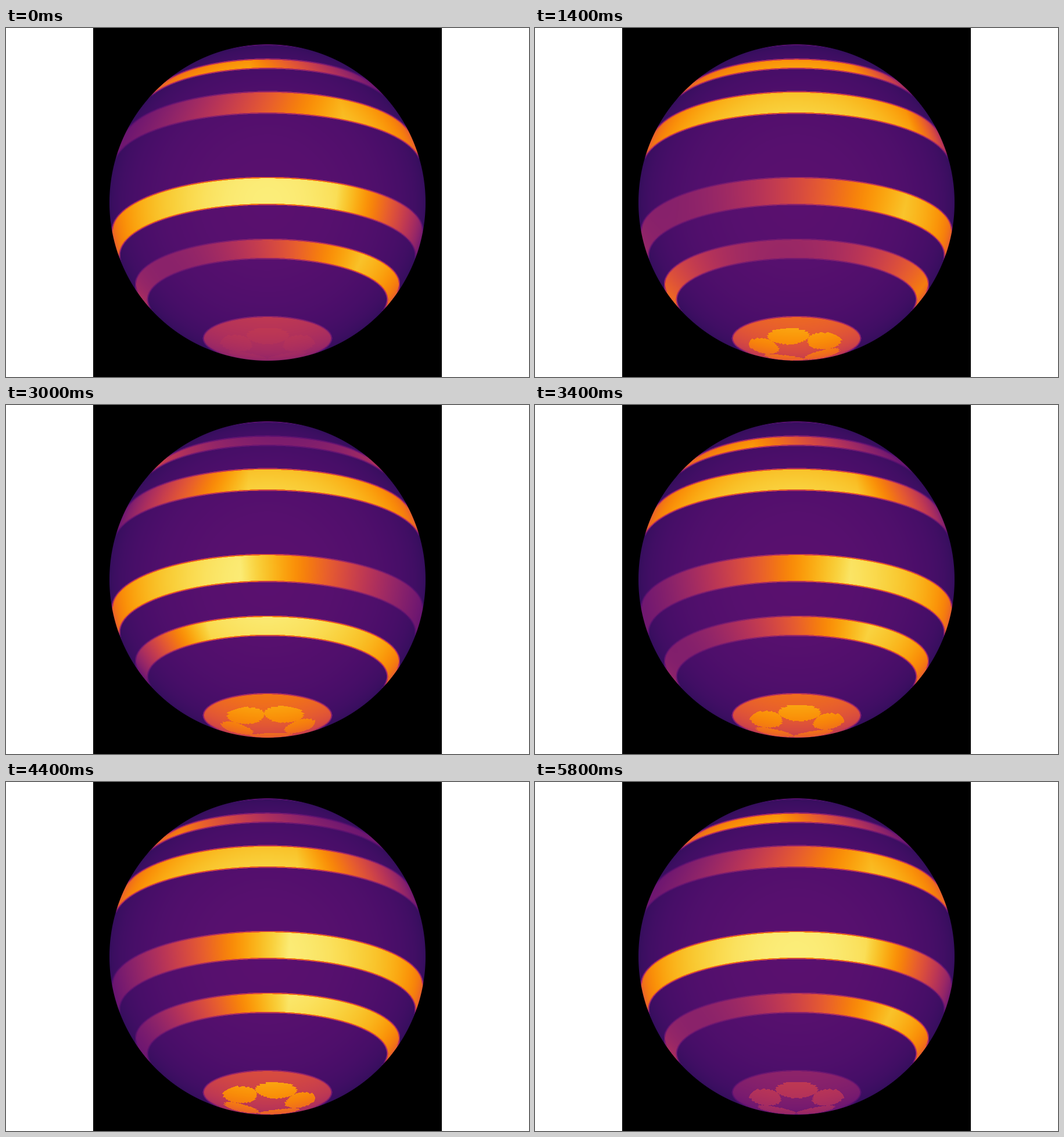
Recreate the animation shown at these times as an HTML page with a canvas. Size 900x600 px, loop 6000 ms.

```html
<!DOCTYPE html>
<html lang="en">
<head>
<meta charset="utf-8">
<title>Banded sphere</title>
<style>
  html, body { margin: 0; width: 100%; height: 100%; overflow: hidden; background: #fff; }
  canvas { display: block; position: absolute; left: 150px; top: 0; width: 600px; height: 600px; }
</style>
</head>
<body>
<canvas id="stage" width="600" height="600"></canvas>
<script>
const SIZE = 600, CENTER = 300, RADIUS = 272;
const LOOP = 6000, STEP = 200, CYCLE = 29;
const RAD = Math.PI / 180, TILT = 20 * RAD;
const LIMB = 0.345, BASE = 0.255, PEAK = 0.947, DIP = 0.53;
const BLUR = 1.4;

const lerp = (a, b, f) => a + (b - a) * f;

// A belt is bright over half of its circle; the other half, starting at
// longitude "edge", dips as a sine and makes "turns" rounds per cycle.
const belt = (from, to, edge, turns) => ({
  from, to,
  glow: (p, phase) => PEAK - DIP * Math.max(0, Math.sin((p.lon - edge - turns * phase) * RAD))
});

// Latitudes in degrees, south positive.
const zones = [
  { from: -91, to: -65, glow: () => 0.52 },
  belt(-45, -38, -9, -12),
  belt(-24.4, -14.4, 210, -6),
  belt(10.9, 20.7, 27, -6),
  belt(33.4, 40.7, 227, -12),
  { from: 66.1, to: 91, glow: capGlow }
];

// Five storms circle the pole, with edges stepped by degree of latitude.
function capGlow(p, phase, n) {
  const lon = p.lon + phase - 0.5;
  const u = (lon - 72 * Math.round(lon / 72)) / 36;
  const v = (Math.round(p.lat) - 78) / 5.7;
  if (u * u + v * v < 1) return Math.min(0.92, 0.585 + 1.1 * Math.sin(Math.PI * n / CYCLE));
  return 0.43 + 0.36 * Math.sin(Math.PI * (n + 4) / (CYCLE + 4));
}

// Spline through a few evenly spaced key colours.
const keys = ['000004', '210c4a', '57106e', '8a226a', 'bc3754', 'e45a31', 'f98e09', 'f9cb35', 'fcffa4']
  .map(hex => [0, 2, 4].map(i => parseInt(hex.slice(i, i + 2), 16)));

function colorAt(value) {
  const last = keys.length - 1, s = value * last;
  const k = Math.min(last - 1, Math.floor(s)), f = s - k;
  const key = i => keys[Math.max(0, Math.min(last, i))];
  return keys[k].map((b, j) => {
    const a = key(k - 1)[j], c = key(k + 1)[j], d = key(k + 2)[j];
    return b + f / 2 * (c - a + f * (2 * a - 5 * b + 4 * c - d + f * (3 * (b - c) + d - a)));
  });
}
const palette = Array.from({ length: 1001 }, (_, i) => colorAt(i / 1000));

function project(x, y) {
  const X = x / RADIUS, Y = y / RADIUS, rr = X * X + Y * Y;
  if (rr > 1) return null;
  const mu = Math.sqrt(1 - rr);
  return {
    mu,
    lat: Math.asin(Math.min(1, Y * Math.cos(TILT) + mu * Math.sin(TILT))) / RAD,
    lon: Math.atan2(X, mu * Math.cos(TILT) - Y * Math.sin(TILT)) / RAD
  };
}

// Zone under a pixel and how much of its neighbourhood the zone fills.
function zoneAround(x, y) {
  let zone = null, hits = 0, samples = 0;
  for (let i = 0; i < 9; i++) {
    const q = project(x + (i % 3 - 1) * BLUR, y + (Math.floor(i / 3) - 1) * BLUR);
    if (!q) continue;
    samples++;
    const found = zones.find(z => q.lat > z.from && q.lat < z.to);
    if (found) { zone = found; hits++; }
  }
  return { zone, weight: samples ? hits / samples : 0 };
}

// Fixed geometry of every visible pixel.
const points = [];
for (let py = 0; py < SIZE; py++) {
  for (let px = 0; px < SIZE; px++) {
    const x = px + 0.5 - CENTER, y = py + 0.5 - CENTER, r = Math.hypot(x, y);
    if (r > RADIUS + 0.5) continue;
    const shrink = Math.min(1, (RADIUS - 0.05) / r);
    const p = project(x * shrink, y * shrink);
    points.push({
      at: (py * SIZE + px) * 4, lat: p.lat, lon: p.lon,
      ...zoneAround(x, y),
      light: 1 - LIMB * (1 - p.mu),
      cover: Math.min(1, RADIUS + 0.5 - r)
    });
  }
}

const ctx = document.getElementById('stage').getContext('2d');
const picture = ctx.createImageData(SIZE, SIZE);
for (let i = 3; i < picture.data.length; i += 4) picture.data[i] = 255;

function draw(n) {
  const phase = 360 / CYCLE * n;
  for (const p of points) {
    const value = p.zone ? lerp(BASE, p.zone.glow(p, phase, n), p.weight) : BASE;
    const color = palette[Math.round(value * p.light * 1000)];
    for (let j = 0; j < 3; j++) picture.data[p.at + j] = color[j] * p.cover;
  }
  ctx.putImageData(picture, 0, 0);
}

let shown = -1;
function tick() {
  const n = Math.floor(performance.now() % LOOP / STEP);
  if (n !== shown) draw(shown = n);
  requestAnimationFrame(tick);
}
tick();
</script>
</body>
</html>
```
